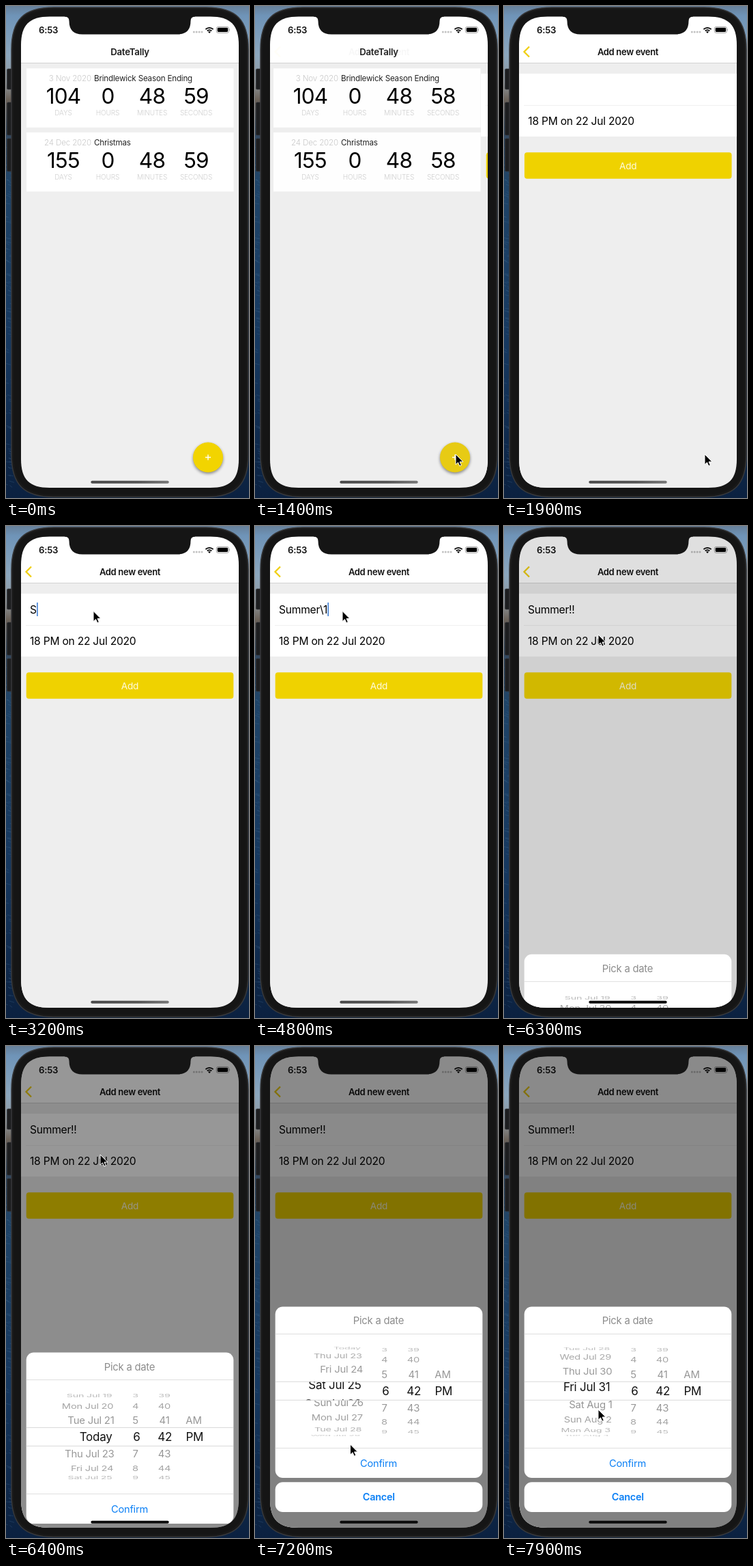
Write an HTML page that moves like this. It is 356 px wide and 720 px high and loops after 8000 ms.

```html
<!DOCTYPE html>
<html lang="en">
<head>
<meta charset="utf-8">
<title>Event timer</title>
<style>
  html, body { margin: 0; width: 100%; height: 100%; overflow: hidden; background: #0d2747; }
  svg { display: block; width: 356px; height: 720px; }
  text { font-family: Inter, "Open Sans", sans-serif; letter-spacing: -.015em; white-space: pre; }
</style>
</head>
<body>
<svg id="stage" viewBox="0 0 356 720" xmlns="http://www.w3.org/2000/svg"></svg>
<script>
const LOOP = 8000;
const stage = document.getElementById('stage');

// ---- markup helpers ----
const rect = (x, y, w, h, fill, rx = 0, extra = '') =>
  `<rect x="${x}" y="${y}" width="${w}" height="${h}" fill="${fill}" rx="${rx}" ${extra}/>`;
const label = (x, y, size, text, fill = '#000', anchor = 'start', extra = '') =>
  `<text x="${x}" y="${y}" font-size="${size}" fill="${fill}" text-anchor="${anchor}" ${extra}>${text}</text>`;
const mid = (x, y, size, text, fill, extra) => label(x, y, size, text, fill, 'middle', extra);

// Box whose corners ease into the sides; e is how far a corner reaches.
function softBox(x, y, w, h, e, attrs = '') {
  const k = e * .71, s = w - 2 * e, v = h - 2 * e;
  return `<path ${attrs} d="M${x + e} ${y}h${s}c${k} 0 ${e} ${e - k} ${e} ${e}v${v}` +
    `c0 ${k} ${k - e} ${e} ${-e} ${e}h${-s}c${-k} 0 ${-e} ${k - e} ${-e} ${-e}v${-v}` +
    `c0 ${-k} ${e - k} ${-e} ${e} ${-e}z"/>`;
}

// ---- wallpaper with small waves ----
function wallpaper() {
  let seed = 7;
  const rnd = () => (seed = seed * 16807 % 2147483647) / 2147483647;
  let d = '';
  for (let i = 0; i < 130; i++) {
    const x = rnd() * 14 - 6, y = 190 + rnd() * 525;
    d += `M${x.toFixed(1)} ${y.toFixed(1)}l${(3 + rnd() * 6).toFixed(1)} ${(1 + rnd() * 2).toFixed(1)}`;
  }
  return rect(0, 0, 356, 720, 'url(#sea)') +
    `<path d="${d}" stroke="#4a7096" stroke-width=".8" opacity=".35" fill="none"/>`;
}

// ---- list page ----
function card(y, date, name, days) {
  const cols = [[84, days, 'DAYS'], [149, '0', 'HOURS'], [214, '48', 'MINUTES'], [278.5, '59', 'SECONDS']];
  return rect(30, y, 303.5, 86.5, '#fff') +
    label(125, y + 19, 11.6, date, '#c9c9c9', 'end', 'font-weight="300"') +
    label(129, y + 19, 11.6, name, '#222') +
    cols.map(([x, n, unit]) =>
      mid(x, y + 52, 31.5, n, '#000', `style="letter-spacing:-.025em" ${unit === 'SECONDS' ? 'class="sec"' : ''}`) +
      mid(x, y + 68.5, 10, unit, '#cfcfcf', 'font-weight="300"')).join('');
}

const listPage = `<g id="list">
  ${rect(22, 84, 330, 622, '#efefef')}
  ${card(91.3, '3 Nov 2020', 'Brindlewick Season Ending', '104')}
  ${card(185, '24 Dec 2020', 'Christmas', '155')}
  <circle cx="296" cy="662.5" r="22" fill="#000" opacity=".45" filter="url(#blur)"/>
  <circle id="fab" cx="296" cy="660.5" r="22" fill="#f2d400"/>
  <path d="M292 660.5h8M296 656.5v8" stroke="#fff" stroke-width="1.4"/>
  <rect id="shade" x="22" y="84" width="420" height="622" opacity="0"/>
</g>`;

// ---- form page ----
const formPage = `<g id="form">
  ${rect(22, 84, 320, 622, '#eeeeee')}
  ${rect(22, 99, 320, 92, '#fff')}
  ${rect(29, 145, 312, 1, '#f0f0f0')}
  ${label(35, 127.5, 15.6, '', '#000', 'start', 'id="field"')}
  <rect id="caret" y="112" width="1.6" height="20" fill="#3f7fd6"/>
  ${label(35, 174.3, 15.6, '18 PM on 22 Jul 2020')}
  ${rect(29.7, 214.3, 303.6, 38.5, '#efd200', 4)}
  ${mid(181.5, 238.8, 13.6, 'Add', '#fffbe0')}
</g>`;

// ---- header and status bar ----
const header = `${rect(22, 14, 320, 69.5, '#fff')}${rect(22, 83, 320, 1, '#d2d2d2')}
  ${mid(181.5, 71.6, 13.2, 'DateTally', '#1a1a1a', 'id="titleA" font-weight="600"')}
  <g id="titleB">
    ${mid(181.5, 71.6, 13, 'Add new event', '#111', 'font-weight="600" style="letter-spacing:-.025em"')}
    <path d="M37 59.5L29.5 67L37 74.5" fill="none" stroke="#f0cf12" stroke-width="2.3"/>
  </g>
  ${label(48, 39.6, 13.2, '6:53', '#111', 'start', 'font-weight="600"')}
  ${[275.3, 279.2, 283.1, 287].map(x => `<circle cx="${x}" cy="38" r="1.5" fill="#c2c2c2"/>`).join('')}
  <g fill="none" stroke="#000" stroke-width="1.9">
    <path d="M292.4 34.1a8.1 8.1 0 0 1 11.2 0M294.7 36.4a4.9 4.9 0 0 1 6.6 0"/>
  </g>
  <path d="M296 37.8a3 3 0 0 1 4 0l-2 2.1z"/>
  <rect x="308.3" y="30.4" width="18.2" height="9" rx="2.6" fill="none" stroke="#999" stroke-width=".9"/>
  ${rect(309.7, 31.8, 15.4, 6.2, '#000', 1.4)}
  <path d="M327.4 33.2q1.8 1.7 0 3.4z" fill="#999"/>`;

// ---- date picker ----
const MID = 505, STEP = 21.8 * Math.PI / 180, R = 66;
const dayName = i => i === 0 ? 'Today' :
  new Date(Date.UTC(2020, 6, 22 + i)).toUTCString().replace(/^(\w+), (\d+) (\w+).*/, (_, w, d, m) => `${w} ${m} ${+d}`);
const columns = [
  { x: 159, bandX: 155.5, anchor: 'end', from: -4, to: 14, name: dayName },
  { x: 189.5, bandX: 191.5, anchor: 'middle', from: -4, to: 4, name: i => 6 + i },
  { x: 232, bandX: 232.7, anchor: 'middle', from: -4, to: 4, name: i => 42 + i },
  { x: 275, bandX: 276.3, anchor: 'middle', from: -1, to: 0, name: i => i ? 'AM' : 'PM' }
];
const rows = (band) => columns.map((c, n) => {
  let s = '';
  for (let i = c.from; i <= c.to; i++) {
    s += label(0, band ? 6.1 : 5.4, band ? 17 : 15, c.name(i), band ? '#111' : '#777', c.anchor,
      `class="row" data-col="${n}" data-i="${i}" data-band="${band ? 1 : ''}"`);
  }
  return s;
}).join('');

const picker = `<rect id="dim" x="20" y="12" width="324" height="696" opacity="0"/>
<g id="picker">
  ${rect(29.7, 381.5, 303.6, 250.5, '#fff', 11)}
  ${mid(181, 407.4, 14.8, 'Pick a date', '#8c8c8c')}
  ${rect(29.7, 421, 303.6, .8, '#d8d8d8')}
  <g clip-path="url(#around)">${rows(false)}</g>
  <g clip-path="url(#band)">${rows(true)}</g>
  ${rect(29.7, 490.8, 303.6, .8, '#cfcfcf')}${rect(29.7, 517.8, 303.6, .8, '#cfcfcf')}
  ${rect(29.7, 588, 303.6, .8, '#d8d8d8')}
  ${mid(181, 615.6, 14.6, 'Confirm', '#0a7ff5')}
  ${rect(29.7, 638.3, 303.6, 43.7, '#fff', 11)}
  ${mid(181.3, 665.4, 14.4, 'Cancel', '#0a7ff5', 'font-weight="600"')}
</g>`;

const buttons = [[92, 30], [141, 48], [194, 48]]
  .map(([y, h]) => rect(1.5, y, 8, h, '#1d1e20', 1.5, 'stroke="#34363a" stroke-width=".7"')).join('');

stage.innerHTML = `<defs>
  <linearGradient id="sea" x2="0" y2="1">
    <stop offset="0" stop-color="#67809a"/><stop offset=".02" stop-color="#6f94b8"/>
    <stop offset=".1" stop-color="#8ba6bd"/>
    <stop offset=".155" stop-color="#8f979d"/><stop offset=".19" stop-color="#6b6259"/>
    <stop offset=".25" stop-color="#34485e"/><stop offset=".36" stop-color="#1f4468"/>
    <stop offset=".7" stop-color="#16385f"/><stop offset="1" stop-color="#0b2140"/>
  </linearGradient>
  <linearGradient id="bar">
    <stop offset="0" stop-color="#4a4a4a"/><stop offset=".6" stop-color="#555"/><stop offset="1" stop-color="#777"/>
  </linearGradient>
  <filter id="blur" x="-30%" y="-30%" width="160%" height="160%"><feGaussianBlur stdDeviation="2"/></filter>
  <clipPath id="screen">${softBox(22, 15.5, 319, 689.5, 42)}</clipPath>
  <clipPath id="around"><path d="M30 ${MID - 68}h303v54h-303zM30 ${MID + 13.5}h303v54.5h-303z"/></clipPath>
  <clipPath id="band"><rect x="30" y="${MID - 14}" width="303" height="27.5"/></clipPath>
</defs>
${wallpaper()}${buttons}
${softBox(8, 2, 347, 716.5, 62, 'fill="#191919" stroke="#38393b" stroke-width="1.5"')}
${softBox(11.5, 5.5, 340, 709.5, 58, 'fill="#151515"')}
<g clip-path="url(#screen)">${listPage}${formPage}${header}${picker}</g>
${rect(124.3, 694.8, 114.4, 4, 'url(#bar)', 2, 'id="home"')}
<path d="M86 14v1.5q6.500 0 6.500 6.500q0 19.500 19.500 19.500h139q19.500 0 19.500-19.500q0-6.500 6.500-6.500v-1.500z" fill="#151515"/>
<path id="cursor" d="M0 0v15.200l3.500-3.300l2.300 5.300l2.500-1.100l-2.300-5.100h4.900z" stroke="#fff" stroke-width="1" stroke-linejoin="round"/>`;

// ---- motion ----
const $ = id => document.getElementById(id);
const set = (el, k, v) => el.setAttribute(k, v);
const clamp = v => Math.max(0, Math.min(1, v));
const span = (t, a, b) => clamp((t - a) / (b - a));
const smooth = p => p * p * (3 - 2 * p);
const easeOut = p => 1 - (1 - p) ** 3;
const shift = (el, x, y) => set(el, 'transform', `translate(${x.toFixed(2)} ${y.toFixed(2)})`);

const seconds = [...document.querySelectorAll('.sec')];
const wheel = [...document.querySelectorAll('.row')].map(el => ({
  el, col: +el.dataset.col, i: +el.dataset.i, band: !!el.dataset.band
}));

// start, end, x, y
const route = [
  [500, 1100, 294, 656], [1950, 2600, 128, 124.5], [5550, 5950, 138, 159],
  [6550, 6980, 140, 600], [7080, 7450, 138, 532]
];
function pointer(t) {
  let x = 360, y = 700;
  for (const [a, b, tx, ty] of route) {
    const p = smooth(span(t, a, b));
    x += (tx - x) * p;
    y += (ty - y) * p;
  }
  return [x, y];
}

// typing steps: time, text
const typed = [
  [3100, 'S'], [3350, 'Su'], [3550, 'Sum'], [3700, 'Summ'], [3950, 'Summe'], [4150, 'Summer'],
  [4450, 'Summer\\'], [4650, 'Summer\\1'], [4900, 'Summer\\'], [5050, 'Summer'],
  [5250, 'Summer!'], [5400, 'Summer!!']
];

// critically damped spring
function push(t) {
  const w = Math.max(0, t - 1386) * .01826;
  return t > 2000 ? 1 : 1 - Math.exp(-w) * (1 + w);
}

function turnWheel(turn) {
  for (const { el, col, i, band } of wheel) {
    const c = columns[col], a = (i - (col ? 0 : turn)) * STEP;
    const show = Math.abs(a) < (band ? 1 : 1.5);
    set(el, 'visibility', show ? 'visible' : 'hidden');
    if (!show) continue;
    const k = Math.cos(a);
    const x = band ? c.bandX : c.x - (col ? 0 : (1 - k) * 6);
    const y = MID + R * Math.sin(a) * (band ? 1.1 : 1);
    set(el, 'transform', `translate(${x.toFixed(2)} ${y.toFixed(2)}) scale(${(.92 + .08 * k).toFixed(3)} ${k.toFixed(3)})`);
    set(el, 'opacity', band ? 1 : (.3 + .5 * k).toFixed(3));
  }
}

let lastText;
function draw(t) {
  const left = String(59 - Math.floor((t + 300) / 1000));
  for (const s of seconds) if (s.textContent !== left) s.textContent = left;

  const p = push(t);
  shift($('list'), -95.7 * p, 0);
  set($('shade'), 'opacity', .07 * p);
  shift($('form'), 319 * (1 - p), 0);
  set($('titleA'), 'opacity', 1 - p);
  set($('titleB'), 'opacity', p);
  set($('fab'), 'fill', t > 1300 ? '#e8cc14' : '#f2d400');

  let text = '';
  for (const [at, s] of typed) if (t >= at) text = s;
  if (text !== lastText) {
    $('field').textContent = text;
    set($('caret'), 'x', 35.3 + (text ? $('field').getComputedTextLength() : 0));
    lastText = text;
  }
  set($('caret'), 'opacity', t >= 2700 && t < 6100 ? 1 : 0);

  const up = easeOut(span(t, 6273, 6586));
  shift($('picker'), 0, 325 * (1 - up));
  set($('dim'), 'opacity', .46 * Math.min(1, up * 1.12));
  set($('home'), 'fill', up > 0 ? '#0c0c0c' : 'url(#bar)');
  turnWheel(9.21 * easeOut(span(t, 7080, 7950)));

  shift($('cursor'), ...pointer(t));
}

function tick(now) {
  draw(now % LOOP);
  requestAnimationFrame(tick);
}
draw(0);
requestAnimationFrame(tick);
</script>
</body>
</html>
```
